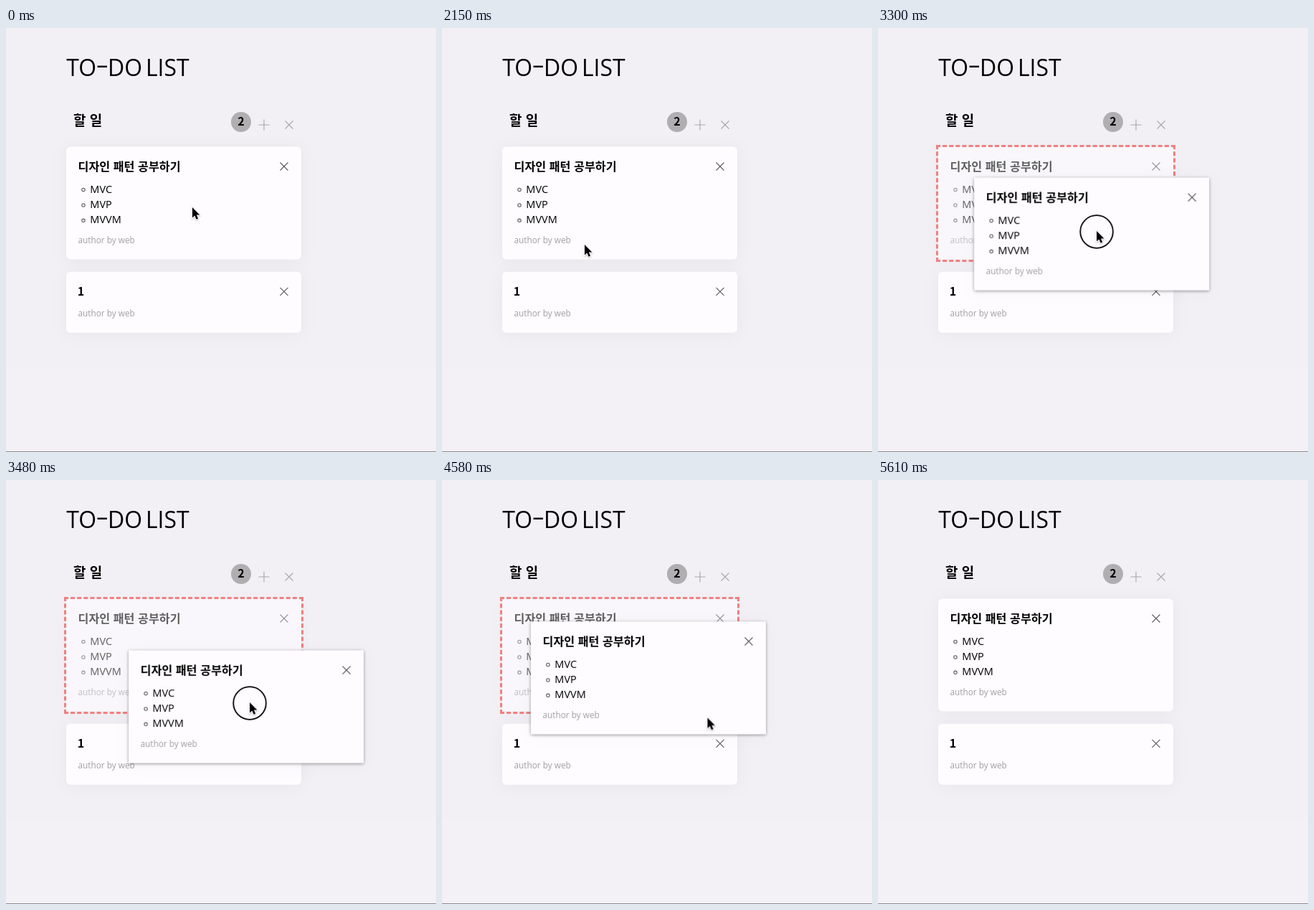
Write an HTML page that moves like this. It is 600 by 591 pixels and loops after 5670 ms.

```html
<!DOCTYPE html>
<html lang="ko">
<head>
<meta charset="utf-8">
<title>TO-DO LIST</title>
<style>
html, body { margin: 0; width: 100%; height: 100%; overflow: hidden; background: #f2f0f5; }
svg { display: block; width: 600px; height: 591px; }
text { font-family: "Open Sans", "Noto Sans", sans-serif; fill: #000; }
.ko, .num { font-family: "Noto Sans CJK KR", "Noto Sans CJK", sans-serif; font-weight: 700; }
.title { font-size: 31.9px; word-spacing: -3.5px; }
.column { font-size: 19px; }
.head { font-size: 16.2px; }
.num { font-size: 16px; }
.list { font-size: 14.5px; font-weight: 500; }
.author { font-size: 11.8px; fill: #a19fa2; }
.field { font-family: "Liberation Sans", Arial, sans-serif; font-size: 14.4px; }
.button { font-size: 14px; fill: #fff; text-anchor: middle; }
.line { fill: none; stroke: #5c5a5d; stroke-width: 1.1; }
.pale { stroke: #a9a7aa; }
.panel { fill: #fefcff; }
.soft { filter: drop-shadow(0 2px 11px rgba(0, 0, 0, .045)); }
.lifted { filter: drop-shadow(0 1px 2px rgba(0, 0, 0, .4)) drop-shadow(0 2px 11px rgba(0, 0, 0, .03)); }
.dashed { box-sizing: border-box; width: 334px; height: 163px; border: 3px dashed #f08080; }

#view, #edit, #second, #frame, #ghost, #cursor, #arrow, #hand, #press {
  animation: 5670ms linear infinite;
}
#view { animation-name: view; animation-timing-function: step-end; }
#edit { animation-name: edit; animation-timing-function: step-end; }
#second { animation-name: second; animation-timing-function: step-end; }
#frame { animation-name: frame; animation-timing-function: step-end; }
#arrow { animation-name: arrow; animation-timing-function: step-end; }
#hand { animation-name: hand; animation-timing-function: step-end; }
#press { animation-name: press; animation-timing-function: step-end; }
#ghost { animation-name: ghost; }
#cursor { animation-name: cursor; }

@keyframes view {
  0%, 35.1% { opacity: 1; }
  3.7% { opacity: 0; }
  55.03% { opacity: .6; }
  85.54%, 100% { opacity: 1; }
}
@keyframes edit {
  0%, 35.1%, 100% { opacity: 0; }
  3.7% { opacity: 1; }
}
@keyframes second {
  0%, 35.1%, 100% { transform: none; }
  3.7% { transform: translateY(23px); }
}
@keyframes frame {
  0%, 85.54%, 100% { opacity: 0; }
  55.03% { opacity: 1; }
}
@keyframes arrow {
  0%, 35.1% { opacity: 1; }
  18.17% { opacity: 0; }
  98.94%, 100% { opacity: 0; }
}
@keyframes hand {
  0%, 35.1%, 100% { opacity: 0; }
  18.17% { opacity: 1; }
}
@keyframes press {
  0%, 74.25%, 100% { opacity: 0; }
  48.32% { opacity: 1; }
}
@keyframes ghost {
  0%, 55.02% { opacity: 0; transform: translate(13px, 14px); }
  55.03% { opacity: 1; transform: translate(13px, 14px); }
  61.38% { transform: translate(87px, 72px); }
  64.2% { transform: translate(107.5px, 86.5px); }
  65.78% { transform: translate(116px, 92px); }
  74.43% { transform: translate(119.5px, 95.5px); animation-timing-function: cubic-bezier(.37, 0, .63, 1); }
  84.92%, 85.53% { opacity: 1; transform: none; }
  85.54%, 100% { opacity: 0; transform: none; }
}
@keyframes cursor {
  0%, 14.46% { transform: translate(260px, 250px); animation-timing-function: ease-in-out; }
  20.28%, 42.68% { transform: translate(199px, 302px); animation-timing-function: ease-in-out; }
  48.32%, 54.5% { transform: translate(264px, 251px); }
  61.38% { transform: translate(340px, 310px); }
  64.2% { transform: translate(359px, 322.5px); }
  65.78% { transform: translate(366.5px, 327.5px); }
  74.25%, 98.4% { transform: translate(370.5px, 331.5px); }
  98.41%, 100% { transform: translate(437px, 343px); }
}
</style>
</head>
<body>
<svg viewBox="0 0 600 591">
  <defs>
    <path id="x" d="M-5.5-5.5 5.5 5.5M5.5-5.5-5.5 5.5"/>
    <g id="card">
      <text class="ko head" x="100.5" y="199">디자인 패턴 공부하기</text>
      <use href="#x" class="line" x="388" y="193"/>
      <g class="line">
        <circle cx="108" cy="225.5" r="2.2"/>
        <circle cx="108" cy="247" r="2.2"/>
        <circle cx="108" cy="268.3" r="2.2"/>
      </g>
      <g class="list">
        <text x="117.3" y="229.7">MVC</text>
        <text x="117.3" y="251">MVP</text>
        <text x="117.3" y="272.3">MVVM</text>
      </g>
      <text class="author" x="100.5" y="300">author by web</text>
    </g>
  </defs>

  <rect width="600" height="591" fill="#f2f0f5"/>
  <rect y="474" width="600" height="117" fill="#f3f1f6"/>
  <rect y="590" width="600" height="1" fill="#8c8a8d"/>

  <text class="title" x="84.3" y="66.5">TO<tspan dy="-4">–</tspan><tspan dy="4">DO LIST</tspan></text>
  <text class="ko column" x="94" y="136">할 일</text>
  <circle cx="328" cy="131" r="14" fill="#b0aeb1"/>
  <text class="num" x="328" y="135.8" text-anchor="middle">2</text>
  <path class="line pale" d="M352.5 135h15M360 127.5v15"/>
  <use href="#x" class="line pale" x="395" y="135"/>

  <g id="second">
    <rect class="panel soft" x="84" y="339.8" width="328" height="85" rx="6"/>
    <text class="num" x="99.8" y="373">1</text>
    <use href="#x" class="line" x="388" y="367.3"/>
    <text class="author" x="100.5" y="402">author by web</text>
  </g>

  <g id="view">
    <rect class="panel soft" x="84" y="165.5" width="328" height="157" rx="6"/>
    <use href="#card"/>
  </g>

  <g id="edit">
    <rect class="panel soft" x="83.5" y="165" width="329" height="181" rx="7"/>
    <rect x="83.5" y="165" width="329" height="181" rx="7" fill="none" stroke="#1466b8" stroke-width="1.2"/>
    <text class="ko head" x="100.5" y="199">디자인 패턴 공부하기</text>
    <text class="field" x="100" y="231">MVC</text>
    <text class="field" x="100" y="251.5">MVP</text>
    <text class="field" x="100" y="272">MVVM</text>
    <rect x="105" y="286" width="139" height="42.5" rx="6" fill="#767476"/>
    <rect x="252" y="286" width="138.5" height="42.5" rx="6" fill="#0066d9"/>
    <text class="ko button" x="174.5" y="311.2">취소</text>
    <text class="ko button" x="321.3" y="311.2">등록</text>
  </g>

  <foreignObject id="frame" x="81" y="162.5" width="334" height="163">
    <div class="dashed"></div>
  </foreignObject>

  <g id="ghost">
    <rect class="panel lifted" x="84" y="165.3" width="328" height="157.2"/>
    <use href="#card"/>
  </g>

  <g id="cursor">
    <circle id="press" cy="1" r="22.8" fill="none" stroke="#000" stroke-width="1.8"/>
    <path id="arrow" d="M0 0V14.6L3.3 11.5 5.6 16.8 8.1 15.7 5.9 10.5H10.4Z"
          fill="#000" stroke="#fff" stroke-width="1.8" paint-order="stroke"
          style="filter:drop-shadow(0 1px 1px rgba(0,0,0,.25))"/>
    <path id="hand" fill="#fff" stroke="#000" stroke-width="1.1" stroke-linejoin="round"
          d="M-1 1c0-2 2.6-2 3 0l1.3 5c.6-1 2.4-.8 2.6.3.8-.9 2.3-.5 2.5.6.9-.7 2.3 0 2.4 1.2l.4 4c0 2-.8 3-1.2 5.2H3.4c-.6-2-2.6-4-4.6-6.2-.9-1.2.6-2.6 2-1.6l1 .8z"/>
  </g>
</svg>
</body>
</html>
```
